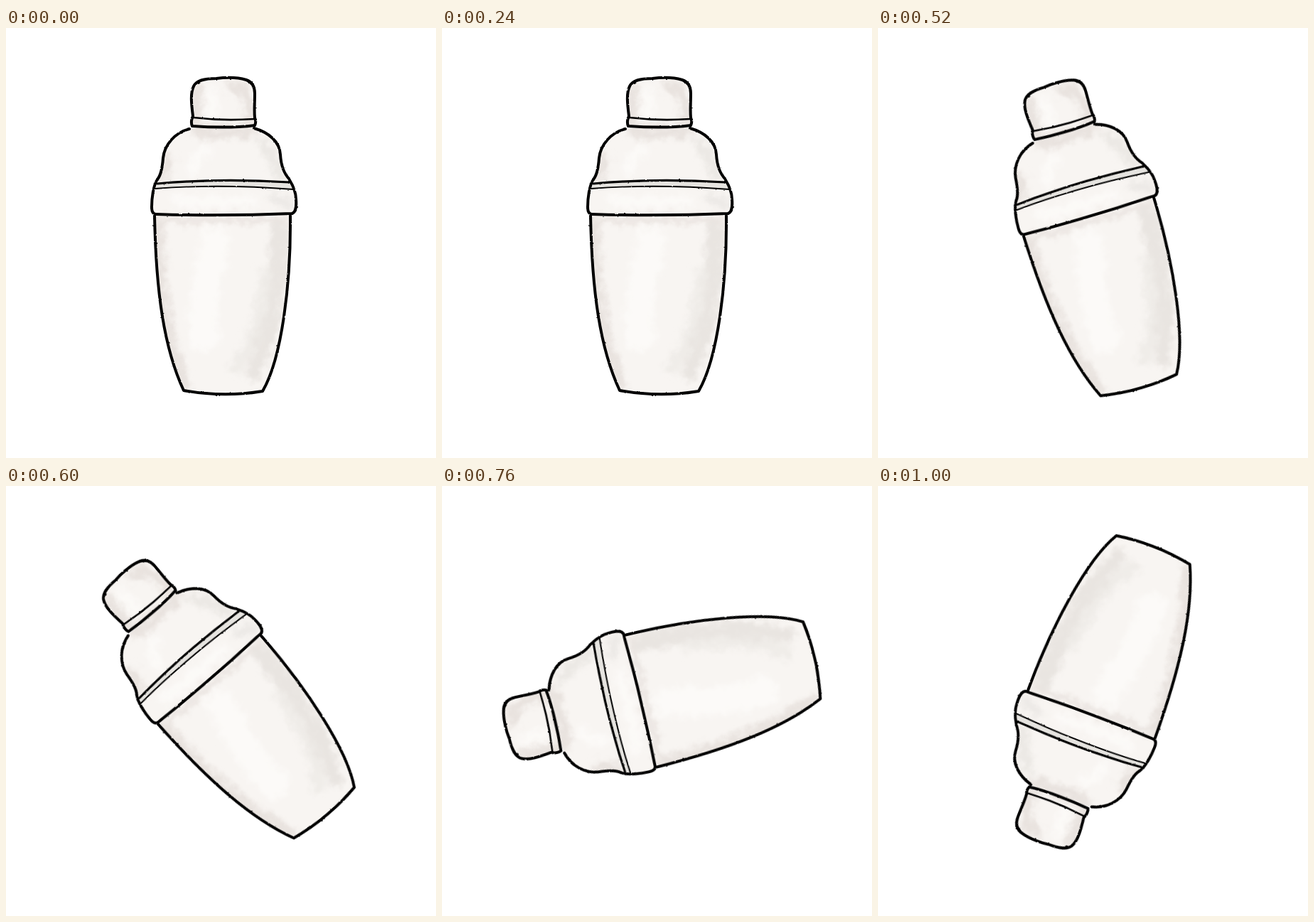
Recreate the animation shown at these times as an HTML page. Size 605 px wide and 605 px high, loop 1040 ms.

```html
<!DOCTYPE html>
<html lang="en">
<head>
<meta charset="utf-8">
<title>Cocktail shaker</title>
<style>
  html, body { margin: 0; width: 100%; height: 100%; overflow: hidden; background: #fff; }
  svg { display: block; width: 100%; height: 100%; }
  .ink { fill: none; stroke: #000; stroke-width: 4; stroke-linecap: round; stroke-linejoin: round; }
  .wash { fill: none; stroke: #e8e2de; stroke-width: 16; stroke-linecap: round; }
</style>
</head>
<body>
<svg viewBox="0 0 605 605">
  <defs>
    <filter id="rough" filterUnits="userSpaceOnUse" x="190" y="55" width="235" height="475">
      <feTurbulence type="fractalNoise" baseFrequency=".2" numOctaves="2" seed="4"/>
      <feDisplacementMap in="SourceGraphic" scale="2" xChannelSelector="R" yChannelSelector="G"/>
    </filter>
    <filter id="soft" filterUnits="userSpaceOnUse" x="190" y="55" width="235" height="475">
      <feTurbulence type="fractalNoise" baseFrequency=".07" numOctaves="4" seed="9" result="noise"/>
      <feGaussianBlur in="SourceGraphic" stdDeviation="5"/>
      <feDisplacementMap in2="noise" scale="18" xChannelSelector="R" yChannelSelector="G"/>
    </filter>

    <path id="cap" d="M262 138C260 133 261 128 263 124C261 108 259 92 264 82C268 74 278 71 296 71C312 69 328 70 338 73C347 76 350 84 350 92C350 106 349 117 350 126C352 131 351 135 350 137C326 140 290 140 262 138Z"/>
    <path id="dome" d="M260 141C238 147 223 164 221 183C220 197 218 207 213 213L207 226H405L399 213C391 205 387 195 386 178C385 160 370 147 347 140Z"/>
    <path id="ring" d="M213 213C207 222 205 240 205 252C205 259 207 262 211 262Q305 265 402 261C407 260 409 252 408 241C408 230 404 222 399 214Z"/>
    <path id="body" d="M209 262C211 370 222 450 250 510Q306 520 361 511C388 465 401 360 400 262Z"/>
    <clipPath id="outline">
      <use href="#cap"/><use href="#dome"/><use href="#ring"/><use href="#body"/>
    </clipPath>
  </defs>

  <g id="shaker">
    <g fill="#f8f5f2">
      <use href="#body"/><use href="#dome"/><use href="#ring"/><use href="#cap"/>
    </g>
    <g clip-path="url(#outline)">
      <g filter="url(#soft)">
        <path class="wash" d="M213 275C217 370 226 450 252 506"/>
        <path class="wash" d="M215 270H398" style="stroke-width:9"/>
        <path class="wash" d="M384 285C384 370 374 430 348 484" style="stroke:#e9e5e1;stroke-width:24"/>
        <path class="wash" d="M364 345C362 400 346 445 322 480" style="stroke:#efece8"/>
        <path class="wash" d="M270 147H345M228 185C226 200 220 210 218 214"/>
        <path class="wash" d="M362 160C374 175 376 195 388 210" style="stroke:#ebe8e4"/>
        <path class="wash" d="M267 85V132M318 82Q344 82 342 130"/>
        <path class="wash" d="M376 238L398 248" style="stroke:#ece9e6"/>
        <path class="wash" d="M295 300C282 350 276 390 279 435" style="stroke:#fcfaf8;stroke-width:40"/>
        <path class="wash" d="M282 170Q268 185 262 200M290 90V120M240 244H345" style="stroke:#fcfaf8"/>
      </g>
      <path d="M213 220Q300 212 399 217L404 227Q300 219 210 226Z" fill="#e6e4e0"/>
    </g>
    <g class="ink" filter="url(#rough)">
      <path d="M209 264C211 370 222 450 250 510Q306 520 361 511C388 465 401 360 400 264"/>
      <path d="M258 142C238 147 223 164 221 183C220 197 218 207 213 213"/>
      <path d="M349 141C370 147 385 160 386 178C387 195 391 205 399 213"/>
      <use href="#cap"/>
      <path d="M264 126Q305 131 349 128" style="stroke-width:2.6"/>
      <path d="M213 213C207 222 205 240 205 252C205 259 207 262 211 262Q305 265 402 261C407 260 409 252 408 241C408 230 404 222 399 214"/>
      <path d="M213 219Q300 211 398 217" style="stroke-width:3.2"/>
      <path d="M210 226Q300 219 404 227" style="stroke-width:1.8"/>
    </g>
  </g>
</svg>
<script>
  const LOOP = 1040, STEP = 40, PIVOT = '307.7 292.8';
  const SHAKE_END = 240, SHAKE_SIZE = 20, SHAKE_PERIOD = 160;
  const TURN_START = 392, TURN_TIME = 618, TURN_ANGLE = 159.3;
  const shaker = document.getElementById('shaker');

  const shakeOffset = t =>
    t < SHAKE_END ? -SHAKE_SIZE * Math.sin(2 * Math.PI * t / SHAKE_PERIOD) : 0;

  const turnAngle = t => {
    if (t <= 400) return 0;
    const p = Math.min((t - TURN_START) / TURN_TIME, 1);
    return TURN_ANGLE * (1 - Math.cos(Math.PI * p)) / 2;
  };

  function draw(now) {
    const t = Math.floor(now % LOOP / STEP) * STEP;
    shaker.setAttribute('transform',
      `translate(0 ${shakeOffset(t).toFixed(2)}) rotate(${-turnAngle(t)} ${PIVOT})`);
  }

  const start = performance.now();
  function tick() {
    draw(performance.now() - start);
    requestAnimationFrame(tick);
  }
  tick();
</script>
</body>
</html>
```
